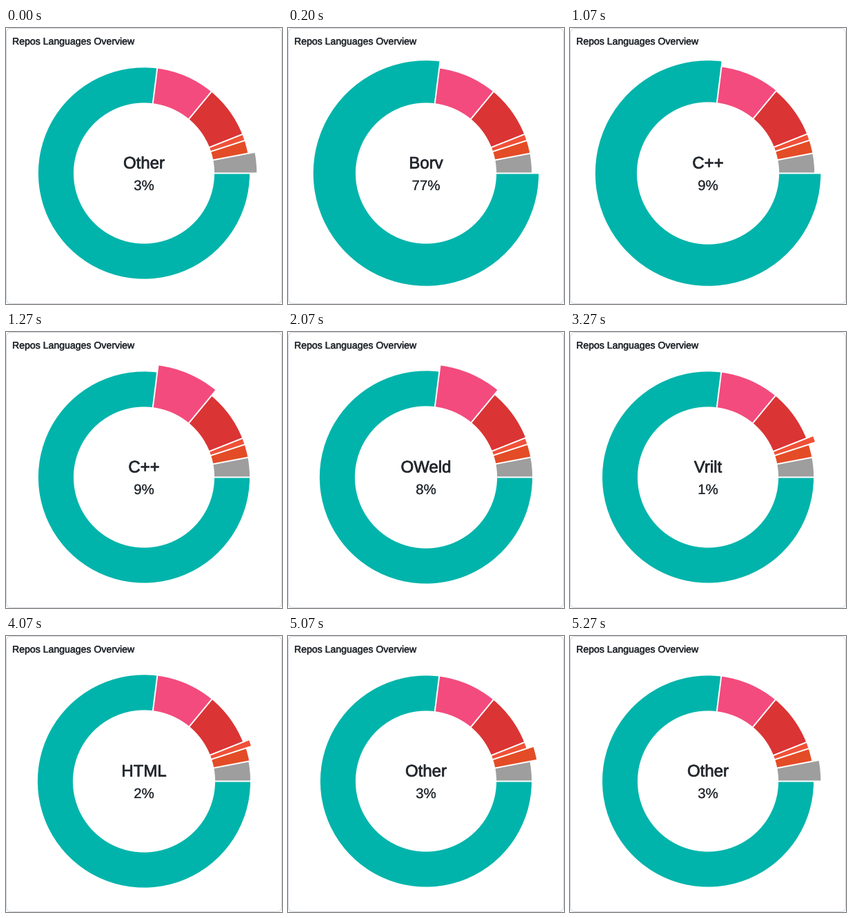
Animation of 400 by 400 pixels, one loop 5990 ms. Source, as a matplotlib script:

```python
import math

import matplotlib.pyplot as plt
from matplotlib.animation import FuncAnimation
from matplotlib.patches import FancyBboxPatch, Wedge
from matplotlib.patheffects import withStroke

SIZE, DPI = 400, 100
PX = 72 / DPI                  # points per pixel
LOOP, STEP = 5990, 10          # ms
TICK = 1000 / 15               # the chart redraws 15 times a second
TICKS_PER_SLOT = 15            # one slice stays selected for a second
SWAP = 150                     # ms for the selection to change

CX, CY = 200, 210.5
OUTER, BAND, GROWTH = 163.3, 51, 10.2
INK = "#24292f"

# label, percent, colour
SLICES = [
    ("Borv", 77, "#00b4ab"),
    ("C++", 9, "#f34b7d"),
    ("OWeld", 8, "#da3434"),
    ("Vrilt", 1, "#f05138"),
    ("HTML", 2, "#e34c26"),
    ("Other", 3, "#9e9e9e"),
]
# progress already made on the first redraw of each swap
HEAD_START = [0.12, 0.10, 0.10, 0.0, 0.10, 0.0]

plt.rcParams["font.family"] = "Liberation Sans"
plt.rcParams["text.hinting"] = "none"

fig = plt.figure(figsize=(SIZE / DPI, SIZE / DPI), dpi=DPI, facecolor="white")
ax = fig.add_axes([0, 0, 1, 1])
ax.set_xlim(0, SIZE)
ax.set_ylim(SIZE, 0)
ax.axis("off")


def add_text(x, y, text, size, bold=0.0, **kw):
    """Place text by its baseline; bold is extra stroke width in pixels."""
    item = ax.text(x, y, text, fontsize=size * PX, color=INK, va="baseline", **kw)
    item.set_path_effects([withStroke(linewidth=bold * PX, foreground=INK)])
    return item


def add_slices():
    wedges, angle = [], 0
    for _, percent, color in SLICES:
        end = angle + percent * 3.6
        wedge = Wedge((CX, CY), OUTER, angle, end, width=BAND, fc=color, lw=0)
        wedges.append(ax.add_patch(wedge))
        angle = end
    for wedge in wedges:
        c, s = (f(math.radians(wedge.theta2)) for f in (math.cos, math.sin))
        ax.plot([CX + 96 * c, CX + 170 * c], [CY + 96 * s, CY + 170 * s],
                color="white", lw=2 * PX, solid_capstyle="butt", snap=False)
    return wedges


ax.add_patch(FancyBboxPatch((0.5, 0.5), 399, 399,
                            boxstyle="round,pad=0,rounding_size=7",
                            fc="white", ec="#d0d7de", lw=PX))
wedges = add_slices()
add_text(9, 24, "Repos Languages Overview", 14.1, 0.45)
name = add_text(CX, 203.5, "", 24, 0.7, ha="center")
share = add_text(CX, 235, "", 20.5, 0.05, ha="center")


def update(i):
    tick = int((i * STEP + 5) / TICK)
    slot, step = divmod(tick - 1, TICKS_PER_SLOT)
    slot %= len(SLICES)
    previous = (slot - 1) % len(SLICES)
    t = min(1, HEAD_START[slot] + step * TICK / SWAP)

    bands = [BAND] * len(SLICES)
    bands[slot] += GROWTH * t
    bands[previous] += GROWTH * (1 - t)
    # the widest slice always reaches the rim, so the hole breathes
    hole = OUTER - max(bands)
    for wedge, band in zip(wedges, bands):
        wedge.set_radius(hole + band)
        wedge.set_width(band)

    label, percent, _ = SLICES[slot]
    name.set_text(label)
    share.set_text(f"{percent}%")
    return [*wedges, name, share]


anim = FuncAnimation(fig, update, frames=LOOP // STEP, interval=STEP,
                     init_func=lambda: update(0), repeat=True, repeat_delay=0)
plt.show()
```
